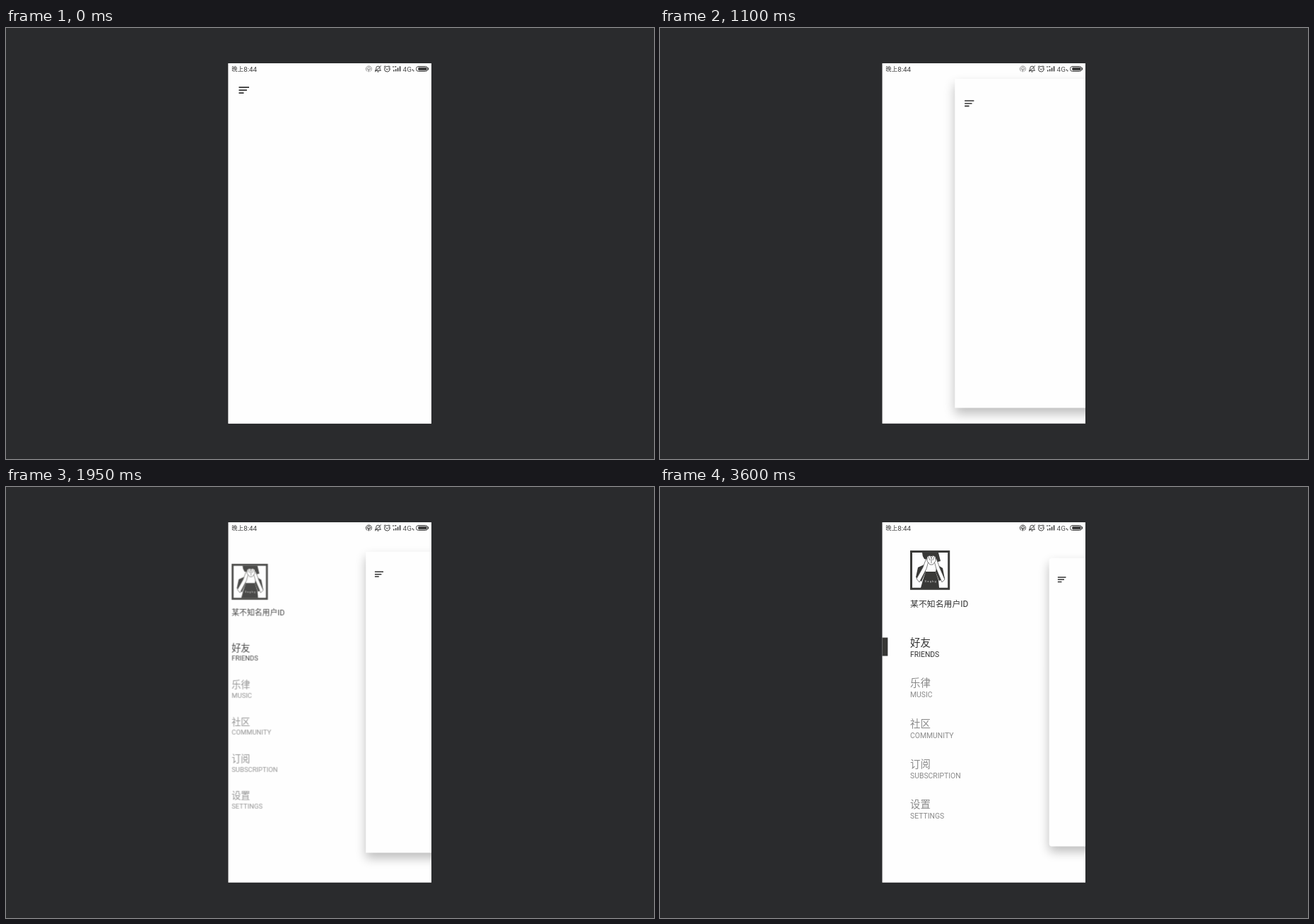
Animation, 917 px wide and 611 px high, one loop 3.7 s. Source, as an HTML page:

```html
<!DOCTYPE html>
<html lang="zh-CN">
<head>
<meta charset="utf-8">
<title>Drawer menu</title>
<style>
  html, body { margin: 0; width: 100%; height: 100%; overflow: hidden; background: #2a2b2d; }
  svg { display: block; width: 917px; height: 611px; }
  text { font-family: Roboto, "Noto Sans CJK SC", "Noto Sans CJK", sans-serif; }
  .line { fill: none; stroke: #3c3c3c; stroke-width: 1; stroke-linecap: round; stroke-linejoin: round; }
</style>
</head>
<body>
<svg viewBox="0 0 917 611" xmlns="http://www.w3.org/2000/svg">
  <defs>
    <clipPath id="screen"><rect x="314.5" y="50" width="287.5" height="510.7"/></clipPath>
    <filter id="blur" filterUnits="userSpaceOnUse" x="-50" y="-50" width="390" height="620">
      <feGaussianBlur stdDeviation="9"/>
    </filter>
  </defs>
  <rect width="917" height="611" fill="#2a2b2d"/>
  <g clip-path="url(#screen)">
    <rect x="314" y="50" width="289" height="512" fill="#fefefe"/>

    <g id="menu" fill="#333">
      <rect x="314" y="213.5" width="8.3" height="26" fill="#373735"/>
      <g transform="translate(354 90)" fill="#393937">
        <rect x="1.5" y="1.5" width="53.2" height="52.8" fill="#fefefe" stroke="#3b3b39" stroke-width="3"/>
        <path d="M17 3H40L43 15 36 17Q37 9 30 8 24 8 24 13L20 12Q17 8 17 3Z"/>
        <path d="M20 20 11 24 8 38 16 44 22 30ZM38 20 46 25 49 40 41 43 36 30Z"/>
        <path d="M22 30H36L40 42 41 53H15L18 42Z"/>
        <g fill="#fefefe" stroke="#4a4a48" stroke-width=".7" stroke-linejoin="round">
          <path d="M26 15 23 26 13 45 9 40 18 24 23 11ZM34 15 37 26 45 45 49 41 42 25 37 11Z"/>
          <path d="M24 9 28 7 30 11 32 7 36 9 36 15 32 20 28 20 24 15Z"/>
          <path d="M26 9 28 14M34 9 32 14M30 11V18" fill="none"/>
        </g>
        <text x="20.5" y="45" font-size="4" letter-spacing="1.3" fill="#ddd">Sagkg</text>
      </g>
      <text x="354" y="170.4" font-size="11.9">某不知名用户ID</text>
    </g>

    <g id="panel">
      <rect id="shade" y="9" width="287.5" height="511" fill="#000" opacity=".26" filter="url(#blur)"/>
      <rect id="sheet" width="287.5" height="511" fill="#fefefe"/>
      <path d="M15.2 34.1H29.7M15.2 38.2H26.6M15.2 42.2H22.2" stroke="#333" stroke-width="1.7"/>
    </g>

    <g fill="#3c3c3c">
      <text x="319.3" y="61.2" font-size="8.4">晚上</text>
      <text x="336.2" y="61.5" font-size="9.8">8:44</text>
      <g id="hotspot" class="line">
        <path d="M511 61.4A4.1 4.1 0 1 1 515.8 61.4M512 59.6A2.2 2.2 0 1 1 514.8 59.6"/>
        <path d="M513.4 58.2V61.8" stroke-width="1.4"/>
      </g>
      <g class="line">
        <path d="M522.5 60.3H530.5L529.2 58.6V56.6Q529 54.2 526.5 54.2 524 54.2 523.8 56.6V58.6ZM525.6 62H527.4"/>
        <path d="M530.6 53.8 522.3 62"/>
        <circle cx="539.3" cy="58.2" r="3.8"/>
        <path d="M535.1 55.1 536.7 53.8M543.5 55.1 541.9 53.8M537.6 57.8 539.2 59.2 541 57.8"/>
      </g>
      <path d="M547.2 54.2h1.6v1.5h-1.6zM550 54.2h2.4v1.2h-2.4zM548 59.6h1.6v1.9h-1.6zM550.9 58.2h1.6v3.3h-1.6zM553.8 56.4h1.6v5.1h-1.6zM556.8 54.3h1.6v7.2h-1.6z"/>
      <text x="561.6" y="61.6" font-size="9.9" fill="#505050">4G</text>
      <path d="M574.8 58.6h1.2v1.6h-1.2zM576.2 59.8h1.2v1.7h-1.2z"/>
      <rect x="580.5" y="54.5" width="16.2" height="6.9" rx="3" class="line"/>
      <rect x="583.3" y="55.7" width="12.2" height="4.5" rx="1"/>
      <rect x="597" y="56.3" width="1.2" height="3.3" rx=".5"/>
    </g>
  </g>
</svg>
<script>
const LOOP = 3700, STEP = 50, BLINK = 492;
const CX = 458, CY = 305.5;
const $ = id => document.getElementById(id);
const menu = $('menu'), panel = $('panel'), hotspot = $('hotspot');
const corners = [$('sheet'), $('shade')];

// Drag progress of the drawer: [time, openness]
const drag = [[150, 0], [850, .2875], [1100, .4355], [1600, .666], [1950, .8245], [2350, .962], [2600, 1]];

const items = [['好友', 'FRIENDS'], ['乐律', 'MUSIC'], ['社区', 'COMMUNITY'], ['订阅', 'SUBSCRIPTION'], ['设置', 'SETTINGS']];

function label(str, y, size, fill) {
  const el = document.createElementNS('http://www.w3.org/2000/svg', 'text');
  const attrs = { x: 354, y, 'font-size': size, fill };
  for (const k in attrs) el.setAttribute(k, attrs[k]);
  el.textContent = str;
  menu.append(el);
}

items.forEach(([zh, en], i) => {
  const fill = i ? '#8a8a8a' : '#333', y = i * 57.4;
  label(zh, 225.8 + y, 14.4, fill);
  label(en, 240.7 + y, 10.4, fill);
});

function slope(i) {
  const a = drag[Math.max(i - 1, 0)], b = drag[Math.min(i + 1, drag.length - 1)];
  return (b[1] - a[1]) / (b[0] - a[0]);
}

// Cubic Hermite through the drag points
function openness(t) {
  const last = drag.length - 1;
  if (t <= drag[0][0]) return 0;
  if (t >= drag[last][0]) return 1;
  const i = drag.findIndex(k => k[0] > t) - 1;
  const [t0, a] = drag[i], [t1, b] = drag[i + 1];
  const d = t1 - t0, u = (t - t0) / d, v = 1 - u;
  return a * v * v * (1 + 2 * u) + b * u * u * (3 - 2 * u)
    + d * u * v * (slope(i) * v - slope(i + 1) * u);
}

function draw(t) {
  const p = openness(t);
  const s = .5 + .5 * p;
  menu.setAttribute('transform', `translate(${CX - 250 * (1 - p)} ${CY}) scale(${s}) translate(${-CX} ${-CY})`);
  menu.setAttribute('opacity', s);
  panel.setAttribute('transform', `translate(${314.3 + 236.4 * p} ${50 + 50.7 * p}) scale(${1 - .2 * p})`);

  const round = 5 * Math.min(Math.max((t - 3350) / 250, 0), 1);
  corners.forEach(el => el.setAttribute('rx', round));

  const faint = Math.floor((t - 2950) / BLINK) % 2 === 0;
  hotspot.setAttribute('opacity', faint ? .55 : 1);
}

const start = performance.now();
function tick() {
  const t = (performance.now() - start) % LOOP;
  draw(Math.floor(t / STEP) * STEP);
  requestAnimationFrame(tick);
}
tick();
</script>
</body>
</html>
```
